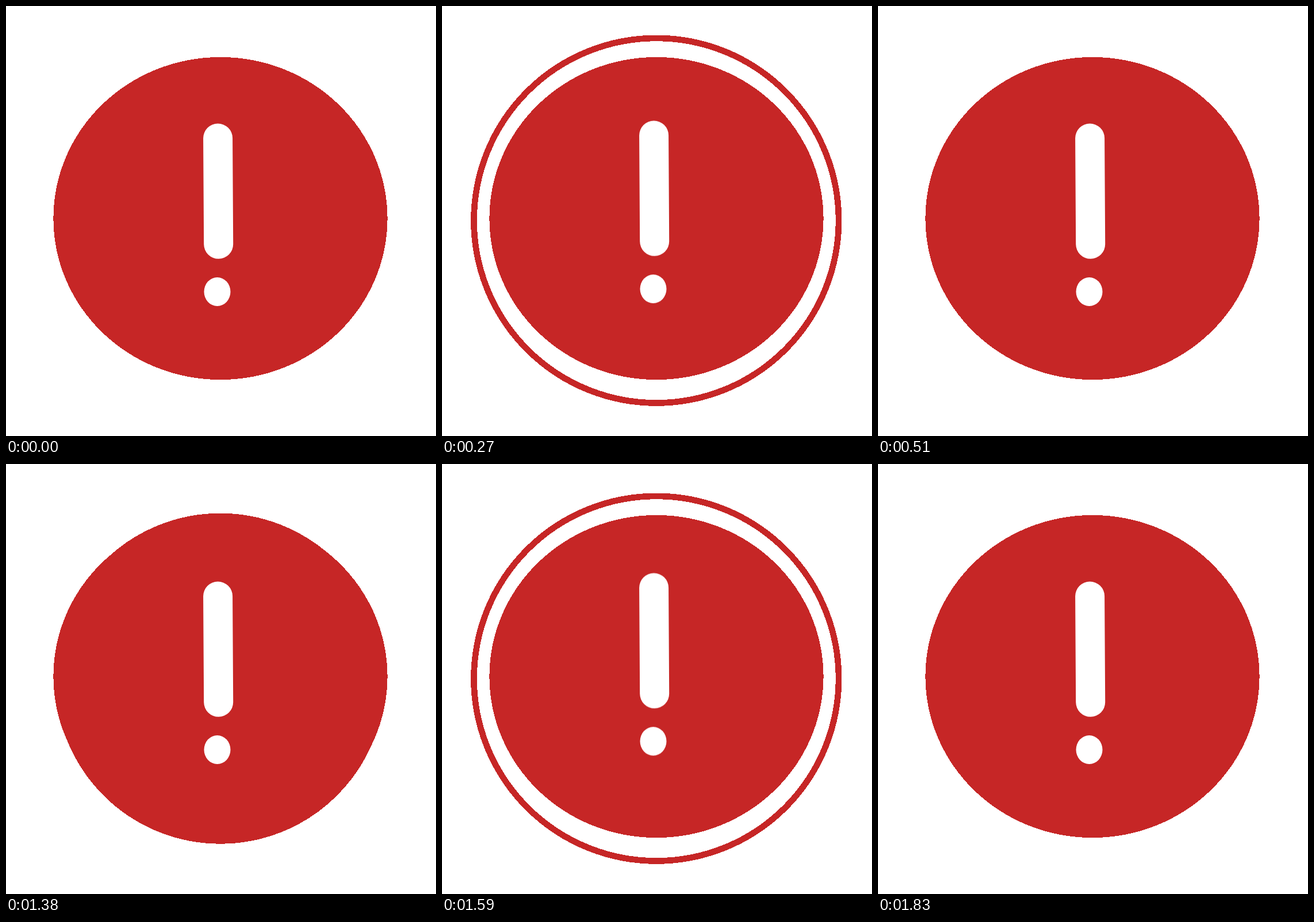
Write an HTML page that moves like this. It is 748 px wide and 748 px high and loops after 2.4 s.

```html
<!DOCTYPE html>
<html lang="en">
<head>
<meta charset="utf-8">
<title>Alert pulse</title>
<style>
  html, body { margin: 0; width: 100%; height: 100%; overflow: hidden; background: #fff; }
  svg { display: block; width: 100vw; height: 100vh; }
  .crisp { shape-rendering: crispEdges; }
</style>
</head>
<body>
<svg viewBox="0 0 748 748">
  <circle id="ring" class="crisp" cx="372.8" cy="373.2" r="280" fill="none" stroke="#c62626" stroke-width="0"/>
  <ellipse class="crisp" cx="373" cy="369.5" rx="290.6" ry="280.6" fill="#c62626"/>
  <g id="mark">
    <line x1="368.6" y1="230" x2="369.7" y2="414.3" stroke="#fff" stroke-width="51" stroke-linecap="round"/>
    <ellipse cx="367.5" cy="497" rx="23" ry="25" fill="#fff"/>
  </g>
</svg>
<script>
  const LOOP = 2400, TICK = 30, TICKS = LOOP / TICK;
  const PULSES = [60, 1380];      // ring starts, ms
  const HOPS = [0, 1380];         // mark starts, ms
  const HOP_PEAK = 5, HOP_STEP = 4.9, PULSE_TICKS = 15;

  // Ticks since the latest start, or -1 before the first one.
  const ticksSince = (starts, ms) => {
    const begun = starts.filter(start => start <= ms).pop();
    return begun === undefined ? -1 : (ms - begun) / TICK;
  };

  function ringPose(ms) {
    const k = ticksSince(PULSES, ms);
    if (k < 0 || k >= PULSE_TICKS) return { r: '280px', strokeWidth: '0px' };
    const outer = 287.5 + 16.9 * Math.log(1 + k);
    const width = 30 / (1 + (k / 5.75) ** 3);
    return { r: `${outer - width / 2}px`, strokeWidth: `${width}px` };
  }

  function markPose(ms) {
    const k = ms < PULSES[0] ? 0 : ticksSince(HOPS, ms);
    const height = Math.max(0, HOP_PEAK - Math.abs(HOP_PEAK - k));
    return { transform: `translateY(${-height * HOP_STEP}px)` };
  }

  function play(id, pose) {
    const frames = Array.from({ length: TICKS + 1 }, (_, i) => ({
      ...pose(i % TICKS * TICK), offset: i / TICKS, easing: 'step-end'
    }));
    document.getElementById(id).animate(frames, { duration: LOOP, iterations: Infinity });
  }

  play('ring', ringPose);
  play('mark', markPose);
</script>
</body>
</html>
```
